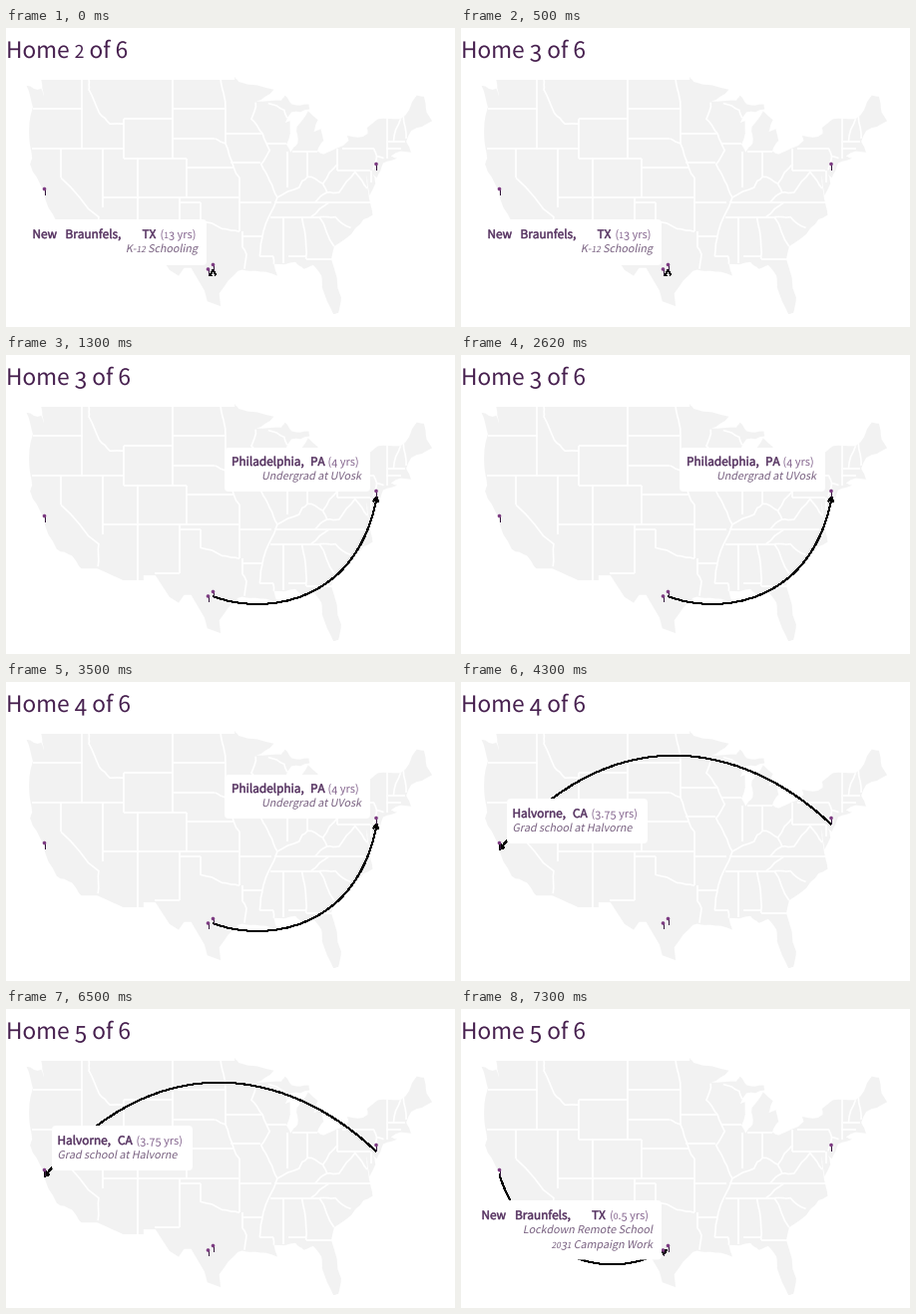
A matplotlib script that plays this animation: 450x300 px, repeating every 8000 ms.

```python
from itertools import groupby

import matplotlib.pyplot as plt
import numpy as np
from matplotlib.animation import FuncAnimation
from matplotlib.patches import Circle, FancyBboxPatch, PathPatch, Polygon
from matplotlib.path import Path
from matplotlib.textpath import TextPath
from matplotlib.transforms import Affine2D

W, H, DPI = 450, 300, 100
PX = 72 / DPI
LAND = "#f2f2f2"
TITLE, BOLD, SOFT, ITALIC = "#47204f", "#54305f", "#84648e", "#786080"
PIN, STEM = "#7d3b82", "#32173a"
FONT = dict(family="Noto Sans CJK JP")
rng = np.random.default_rng(4)

# Key points of the outline as (degrees west, degrees north)
PACIFIC = [(122.8, 49), (122.4, 47.3), (122.8, 48.1), (124.9, 48.4), (124, 46.2),
           (124.5, 42.9), (124.1, 41), (124.4, 40.4), (122.5, 37.7), (120.6, 34.5),
           (118.4, 33.8), (117.1, 32.5)]
MEXICO = [(114.8, 32.5), (111.1, 31.3), (108.2, 31.3), (108.2, 31.8), (106.5, 31.8),
          (104.5, 29.6), (103.2, 29), (102.4, 29.8), (101.4, 29.8), (99.5, 27.5),
          (99.1, 26.4), (97.2, 25.9)]
GULF = [(97.4, 27.2), (94.7, 29.5), (92.3, 29.5), (89.1, 29), (89.6, 30.2),
        (86.5, 30.4), (85.3, 29.7), (84, 30.1), (82.8, 29), (82.7, 27.8),
        (81.1, 25.1), (80.4, 25.2), (80, 26.8), (81.4, 30.7)]
ATLANTIC = [(81, 32), (77.9, 33.9), (75.5, 35.2), (76, 36.9), (76.3, 39.3),
            (75.9, 37.2), (75.1, 38.4), (75.5, 39.5), (74.9, 39), (74, 40.5),
            (72, 41), (72.9, 41.2), (70, 41.6), (70.7, 42.7), (70, 43.8), (67, 44.8)]
LAKES = [(67.8, 45.7), (68.2, 47.3), (69.2, 47.4), (70.3, 45.9), (71.5, 45), (74.7, 45),
         (76.3, 44.1), (76.2, 43.5), (79.1, 43.3), (78.9, 42.8), (82.5, 41.4),
         (83.4, 41.7), (82.5, 42.8), (82.9, 44), (83.9, 43.7), (83.3, 44.9),
         (84.7, 45.8), (86.3, 44.2), (86.2, 42.5), (87.2, 41.6), (87.8, 42.4),
         (87.3, 44.8), (88, 44.6), (87.1, 45.7), (84.5, 46), (84.6, 46.5), (87, 46.5),
         (88, 47.4), (88.5, 46.9), (92.1, 46.8), (89.6, 48), (94.6, 48.8),
         (95.2, 49.3), (95.2, 49)]

# Straight borders: (north, from west, to west) and (west, from north, to north)
PARALLELS = [(46, 124, 116.9), (46, 104, 96.5), (45, 111, 104), (43, 104, 98),
             (43.5, 96.5, 91.2), (42.5, 90.6, 87.8), (42, 124.2, 111), (42, 79.8, 75.3),
             (42, 73.5, 71.4), (42.7, 73.3, 70.8), (41.7, 86.9, 83.4), (41, 111, 102),
             (40.6, 95.8, 91.5), (40, 102, 95.3), (39.7, 80.5, 75.8), (37, 114, 94.6),
             (36.5, 103, 100), (36.5, 94.6, 90), (36.5, 89.5, 75.9), (35, 90.1, 83.1),
             (33, 94.2, 91.2), (32, 106.6, 103), (31, 91.6, 89.7), (31, 87.5, 85),
             (30.7, 85, 81.4)]
MERIDIANS = [(120, 42, 39), (117, 49, 42), (114, 42, 36), (111, 45, 41), (109, 41, 31.3),
             (104, 49, 41), (103, 37, 32), (102, 41, 37), (100, 36.5, 34.6),
             (96.5, 46, 42.5), (94.5, 39, 33.5), (94.1, 33.5, 31.9), (88.3, 35, 30.3),
             (87.6, 41.7, 38), (84.8, 41.7, 39), (80.5, 42, 39.7), (75.7, 39.7, 38.5),
             (73.4, 45, 41)]
# Winding borders: rivers and ridges
WEST = [
    [(116, 49), (116, 48), (114.5, 45.6), (113, 44.5), (111, 44.5)],
    [(120, 39), (114.6, 35), (114.7, 32.7)],
    [(97.2, 49), (96.5, 46)],
    [(98, 43), (96.5, 42.5), (95.3, 40), (94.5, 39)],
    [(100, 34.6), (97, 33.8), (94.5, 33.5)],
    [(94.1, 31.9), (93.5, 31.2), (93.8, 29.7)],
    [(92.2, 46.7), (92.8, 45), (91.2, 43.5), (90.2, 41.8), (91.4, 40.4), (90.2, 38.7),
     (89.1, 37), (91.1, 33.5), (91.6, 31)],
]
EAST = [
    [(89.7, 31), (89.6, 30.2)],
    [(90.4, 46.6), (88.1, 45.9), (87.7, 45.1)],
    [(89.1, 37), (86, 38), (84.8, 39.1), (82.6, 38.4), (80.5, 40.4)],
    [(85.6, 35), (85, 32), (85, 30.7)],
    [(81, 32), (83.1, 35), (80.8, 35), (78.6, 33.9)],
    [(84.3, 35), (81.7, 36.5)],
    [(83.7, 36.5), (82, 37.5), (82.6, 38.4)],
    [(82, 37.5), (80.3, 37.5), (78, 39.6), (77, 38.7), (76.3, 37.9)],
    [(75.4, 39.8), (74.9, 41.2), (75.3, 42)],
    [(74.9, 41.2), (73.9, 41)],
    [(72.5, 42.7), (71.5, 45)],
    [(71.1, 45.3), (70.7, 43)],
]

fig = plt.figure(figsize=(W / DPI, H / DPI), dpi=DPI, facecolor="white")
ax = fig.add_axes([0, 0, 1, 1])
ax.set_xlim(0, W)
ax.set_ylim(H, 0)
ax.axis("off")


def project(points):
    west, north = np.array(points, float).T
    return np.column_stack([22 + 7.02 * (124.7 - west), 52 + 9.83 * (49 - north)])


def rough(points, depth=2, amount=0.045):
    """Midpoint displacement: a natural line through a few key points."""
    pts = np.array(points, float)
    for _ in range(depth):
        step = np.diff(pts, axis=0)
        normal = step[:, ::-1] * [1, -1]
        mid = pts[:-1] + step / 2 + normal * rng.normal(0, amount, (len(step), 1))
        pts = np.insert(pts, np.arange(1, len(pts)), mid, axis=0)
    return pts


def advance(s, size):
    """Pen advance of s, including trailing spaces."""
    ends = [TextPath((0, 0), t, size=size, prop=FONT).get_extents().x1
            for t in (s + "|", "|")]
    return ends[0] - ends[1]


def figure_style(ch):
    """Scale and drop that turn lining digits into old-style ones."""
    if ch in "012":
        return 0.78, 0
    return (1, 0.16) if ch in "34579" else (1, 0)


def write(x, y, s, size, color, bold=0, slant=0, right=False):
    runs, pen = [], 0
    for (scale, drop), chars in groupby(s, figure_style):
        run, em = "".join(chars), size * scale
        runs.append((run, em, pen, drop * size))
        pen += advance(run, em)
    if right:
        x -= pen
    out = []
    for run, em, dx, dy in runs:
        if run.strip():
            path = TextPath((0, 0), run, size=em, prop=FONT)
            place = Affine2D().skew(slant, 0).scale(1, -1).translate(x + dx, y + dy)
            out.append(ax.add_patch(PathPatch(place.transform_path(path), fc=color,
                                              ec=color, lw=bold * PX, zorder=6)))
    return out


def stroke(points, color="black", width=1.0, z=3, smooth=False):
    xs, ys = np.array(points, float).T
    return ax.plot(xs, ys, color=color, lw=width * PX, zorder=z, antialiased=smooth,
                   solid_joinstyle="miter", solid_capstyle="butt")


def curve(*pts):
    path = Path(pts, [Path.MOVETO] + [Path.CURVE4] * 3)
    return [ax.add_patch(PathPatch(path, fc="none", ec="black", lw=PX, zorder=3,
                                   antialiased=False))]


def arrow(tip, angle, size=5.5):
    """Open arrowhead pointing along angle (degrees, y down)."""
    legs = [np.radians(angle + 180 + d) for d in (-28, 28)]
    a, b = [(tip[0] + size * np.cos(r), tip[1] + size * np.sin(r)) for r in legs]
    return stroke([a, tip, b])


def card(x0, y0, x1, y1, r=4):
    return [ax.add_patch(FancyBboxPatch((x0 + r, y0 + r), x1 - x0 - 2 * r, y1 - y0 - 2 * r,
                                        boxstyle=f"round,pad={r}", fc="white", lw=0,
                                        zorder=5))]


def heading(y, *words):
    return [p for x, s in words for p in write(x, y, s, 11.8, BOLD, bold=0.5)]


def years(x, y, s):
    return write(x, y, s, 11, SOFT)


def note(x, y, s, right=True):
    return write(x, y, s, 10.7, ITALIC, slant=0.2, right=right)


def pin(x, y):
    stroke([(x, y), (x, y + 5)], STEM, 1, 4)
    ax.add_patch(Circle((x, y), 1.8, fc=PIN, lw=0, zorder=4))


outline = [rough(PACIFIC), MEXICO, rough(GULF), rough(ATLANTIC), rough(LAKES)]
ax.add_patch(Polygon(project(np.vstack(outline)), fc=LAND, lw=0))
borders = [[(a, n), (b, n)] for n, a, b in PARALLELS]
borders += [[(w, a), (w, b)] for w, a, b in MERIDIANS]
borders += [rough(line) for line in WEST + EAST]
for line in borders:
    stroke(project(line), "white", 1.7, 2, smooth=True)
for spot in [(38.5, 161.5), (371, 136.5), (207.5, 237.5), (202.5, 242)]:
    pin(*spot)

titles = {n: write(0, 30, f"Home {n} of 6", 22.6, TITLE) for n in (2, 3, 4, 5)}

stops = [
    stroke([(203, 243), (203, 247.5), (206, 247.5)])
    + arrow((207.5, 242.5), -90, 6)
    + card(10, 192, 201, 238)
    + heading(211, (26.5, "New"), (59.5, "Braunfels,"), (136.5, "TX"))
    + years(154.5, 211, "(13 yrs)")
    + note(192, 225, "K-12 Schooling"),

    curve((207.5, 242), (258, 262), (352, 250), (371.5, 143))
    + arrow((371.5, 142.5), -80)
    + card(219, 93, 365, 137)
    + heading(111, (226, "Philadelphia,"), (305, "PA"))
    + years(322.5, 111, "(4 yrs)")
    + note(356, 125, "Undergrad at UVosk"),

    curve((371, 143), (290, 65), (155, 28), (38.5, 168))
    + arrow((38.5, 168), 131)
    + card(46, 117, 187, 162)
    + heading(136, (51.5, "Halvorne,"), (112, "CA"))
    + years(130.5, 136, "(3.75 yrs)")
    + note(51.5, 150, "Grad school at Halvorne", right=False),

    curve((38.5, 166), (55, 225), (128, 285), (206, 241.5))
    + arrow((206, 241.5), -30)
    + card(10, 192, 201, 251.5)
    + heading(211, (20.5, "New"), (54, "Braunfels,"), (131, "TX"))
    + years(149, 211, "(0.5 yrs)")
    + note(192, 225, "Lockdown Remote School")
    + note(192, 240, "2031 Campaign Work"),
]

# Start time in ms, home number in the title, stop on the map
SCENES = [(0, 2, 0), (500, 3, 0), (1300, 3, 1), (3500, 4, 1),
          (4300, 4, 2), (6500, 5, 2), (7300, 5, 3)]
STEP, LOOP = 100, 8000


def show(artists, on):
    for a in artists:
        a.set_visible(on)


def update(frame):
    _, home, stop = [s for s in SCENES if s[0] <= frame * STEP][-1]
    for n, artists in titles.items():
        show(artists, n == home)
    for i, artists in enumerate(stops):
        show(artists, i == stop)
    return []


anim = FuncAnimation(fig, update, frames=LOOP // STEP, interval=STEP,
                     init_func=lambda: update(0), repeat=True, repeat_delay=0, blit=False)
plt.show()
```
